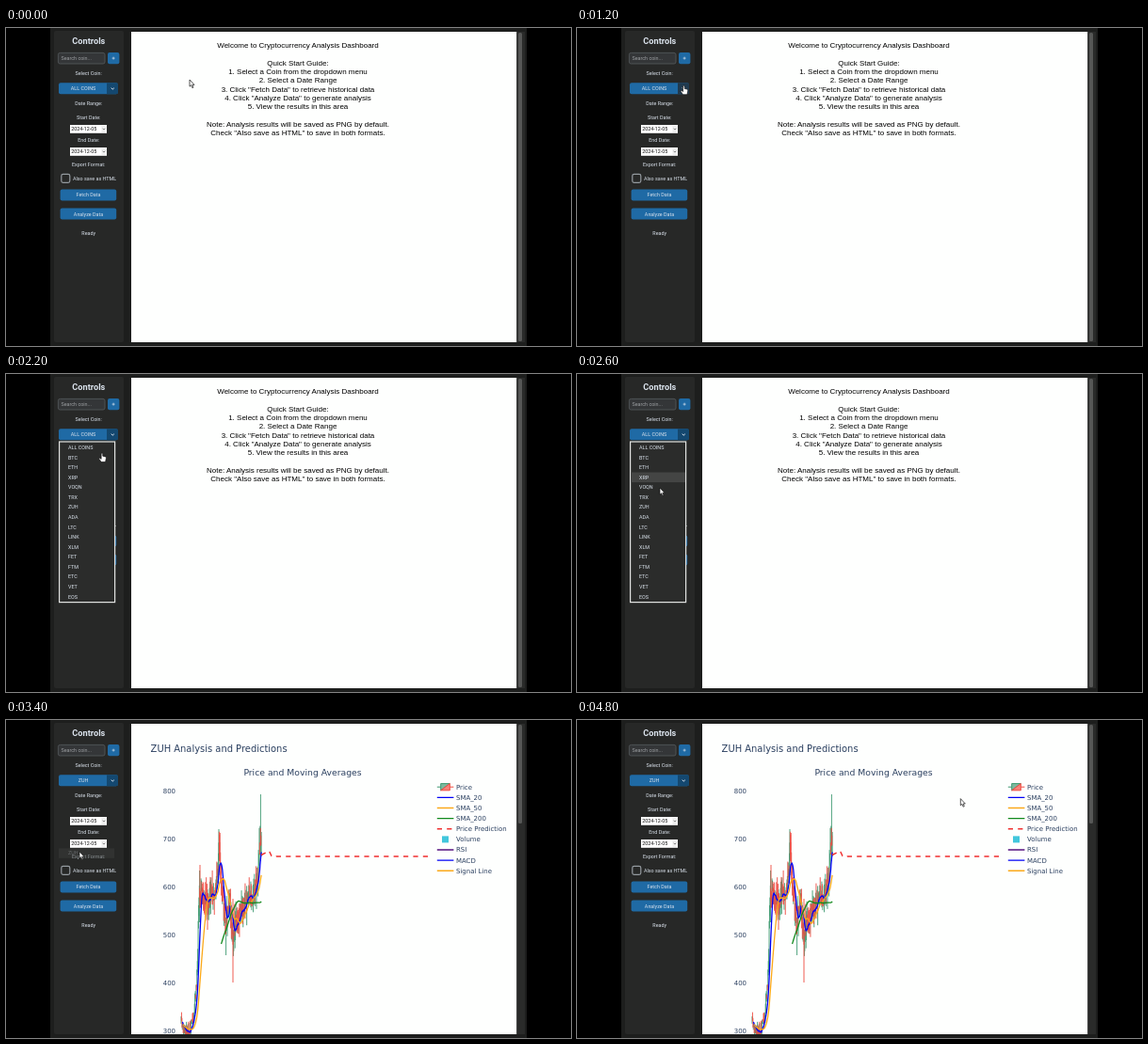
Recreate the animation shown at these times as an HTML page. Size 600 by 338 pixels, loop 5 s.

```html
<!DOCTYPE html>
<html lang="en">
<head>
<meta charset="utf-8">
<title>Dashboard</title>
<style>
html, body { margin: 0; width: 100%; height: 100%; overflow: hidden; background: #000; }
svg { display: block; width: 600px; height: 338px; }
.ui { font: 5.4px Roboto, sans-serif; fill: #dce4ee; }
.guide { font: 8px "Liberation Sans", Arial, sans-serif; fill: #000; }
.plot { font: 6.95px "DejaVu Sans", Verdana, sans-serif; fill: #2a3f5f; }
</style>
</head>
<body>
<svg id="stage" viewBox="0 0 600 338"></svg>
<script>
const NS = "http://www.w3.org/2000/svg";
const LOOP = 5000, STEP = 200;
const COIN = "ZUH";
const stage = document.getElementById("stage");

function add(parent, tag, attrs = {}, text) {
  const el = document.createElementNS(NS, tag);
  for (const key in attrs) el.setAttribute(key, attrs[key]);
  if (text !== undefined) el.textContent = text;
  parent.appendChild(el);
  return el;
}
const group = cls => add(stage, "g", { class: cls });
const box = (parent, x, y, width, height, fill, more = {}) =>
  add(parent, "rect", { x, y, width, height, fill, ...more });
const label = (parent, text, x, y, more = {}) =>
  add(parent, "text", { x, y, "text-anchor": "middle", ...more }, text);
const line = (parent, d, stroke, width, more = {}) =>
  add(parent, "path", { d, stroke, fill: "none", "stroke-width": width, ...more });
const show = (el, on) => el.setAttribute("visibility", on ? "visible" : "hidden");
const LEFT = { "text-anchor": "start" };

// Value at x on straight runs between key points [x, ...values]
function between(keys, x) {
  const i = Math.max(1, keys.findIndex(k => k[0] >= x));
  const a = keys[i - 1], b = keys[i], f = (x - a[0]) / (b[0] - a[0]);
  return a.slice(1).map((v, j) => v + (b[j + 1] - v) * f);
}

// Window
box(stage, 47, 0, 506, 338, "#1d1e1d");
box(stage, 51, 3, 74, 331, "#272827", { rx: 2 });
box(stage, 133, 4, 409.4, 330, "#fefffe");
box(stage, 542.4, 4, 8.6, 330, "#2a2b2a");
const thumb = box(stage, 544, 5, 4, 0, "#565756", { rx: 1.5 });

// Sidebar
const BLUE_BTN = "#1f6aa5";
const ui = group("ui");
label(ui, "Controls", 87.8, 17.3, { style: "font-size:9.2px;font-weight:700" });
box(ui, 55.4, 26.4, 49.6, 11.6, "#343638", { rx: 2, stroke: "#565b5e", "stroke-width": .8 });
label(ui, "Search coin...", 58.5, 34, { ...LEFT, fill: "#9c9fa2" });
box(ui, 108, 26, 12.4, 12.2, BLUE_BTN, { rx: 2 });
line(ui, "M112.6 32.1h3M114.1 30.6v3", "#dce4ee", .7);

[["Select Coin:", 50], ["Date Range:", 82], ["Start Date:", 97],
 ["End Date:", 121], ["Export Format:", 146.6], ["Ready", 219.6]]
  .forEach(([text, y]) => label(ui, text, 87.7, y));

box(ui, 56, 58.2, 62.8, 12, BLUE_BTN, { rx: 2 });
const arrowBox = add(ui, "path", { d: "M107 58.2h10a2 2 0 0 1 2 2v8a2 2 0 0 1-2 2h-10z" });
line(ui, "M111.7 63.7l1.6 1.4 1.6-1.4", "#dce4ee", 1);
const choice = label(ui, "", 82, 66.3);

for (const y of [103, 127]) {
  box(ui, 68, y, 39, 8.8, "#fff");
  box(ui, 101.4, y + .8, 5, 7.2, "#f0f0f0");
  line(ui, `M102.6 ${y + 3.7}l1.3 1.4 1.3-1.4`, "#555", .7);
  label(ui, "2024-12-05", 69.2, y + 6.3, { ...LEFT, fill: "#111" });
}
box(ui, 58.8, 155.4, 9, 9, "none", { rx: 1.8, stroke: "#949a9f", "stroke-width": 1.2 });
label(ui, "Also save as HTML", 71, 161.9, LEFT);
[["Fetch Data", 171.4], ["Analyze Data", 191.6]].forEach(([text, y]) => {
  box(ui, 57.6, y, 59.6, 12, BLUE_BTN, { rx: 2 });
  label(ui, text, 87.5, y + 7.9);
});

// Welcome text
const guide = group("guide");
["Welcome to Cryptocurrency Analysis Dashboard", "", "Quick Start Guide:",
 "1. Select a Coin from the dropdown menu", "2. Select a Date Range",
 "3. Click \"Fetch Data\" to retrieve historical data",
 "4. Click \"Analyze Data\" to generate analysis", "5. View the results in this area", "",
 "Note: Analysis results will be saved as PNG by default.",
 "Check \"Also save as HTML\" to save in both formats."]
  .forEach((text, i) => label(guide, text, 310, 21 + i * 9.32));

// Chart
const clip = add(add(stage, "defs"), "clipPath", { id: "page" });
box(clip, 133, 4, 409.4, 330, "#000");
const chart = group("plot");
chart.setAttribute("clip-path", "url(#page)");
label(chart, COIN + " Analysis and Predictions", 153.6, 33.5, { ...LEFT, style: "font-size:9.93px" });
label(chart, "Price and Moving Averages", 315, 59.4, { style: "font-size:9.27px" });
for (let i = 0; i < 6; i++)
  label(chart, 800 - i * 100, 180, 78.2 + i * 51, { "text-anchor": "end" });

const RED = "#ef4a40", GREEN = "#3d9970", BLUE = "#0000f5", ORANGE = "#fba91a",
  DARK = "#118a1c", PURPLE = "#55107f", DASH = { "stroke-dasharray": "5.2 5.2" };

// Price: a rough trend with seeded noise
const trend = [
  [186, 322], [189, 332], [196, 327], [200, 310], [203, 270], [205, 186], [209, 186],
  [214, 194], [224, 174], [226, 140], [228, 158], [233, 220], [237, 188], [241, 226],
  [246, 216], [254, 194], [264, 182], [268, 162], [270.4, 112], [272, 150]
];
let seed = 11;
const rand = () => (seed = seed * 16807 % 2147483647) / 2147483647;
const DX = .43, closes = [], bars = { [GREEN]: "", [RED]: "" };
for (let x = 186; x < 271.2; x += DX) {
  const [mid] = between(trend, x);
  const swing = mid > 250 ? .45 : 1;
  const y = mid + (rand() - .5) * 24 * swing;
  const last = closes.length ? closes[closes.length - 1][1] : mid;
  const wick = () => rand() ** 2 * 18 * swing;
  const top = Math.min(last, y) - wick(), low = Math.max(last, y) + wick();
  bars[y < last ? GREEN : RED] += `M${x.toFixed(2)} ${top.toFixed(1)}V${low.toFixed(1)}`;
  closes.push([x, y]);
}
line(chart, bars[GREEN] + "M205.6 160V215M226 116V165M233.6 210V250M270.4 79V150", GREEN, .9);
line(chart, bars[RED] + "M206 154V200M214 185V223M226.6 122V150M241 190V279", RED, .9);

function average(span, first, color) {
  const pts = closes.map(([x], i) => {
    const part = closes.slice(Math.max(0, i - span + 1), i + 1);
    return `${x.toFixed(2)} ${(part.reduce((sum, p) => sum + p[1], 0) / part.length).toFixed(1)}`;
  });
  line(chart, "M" + pts.slice(first).join("L"), color, 1.3, { "stroke-linejoin": "round" });
}
average(10, 3, BLUE);
average(25, 5, ORANGE);
average(100, 99, DARK);
line(chart, "M271 143.5L276 141L278 139L280 140.5L282 144.5L284.5 146L287 145H448", "#f02f2f", 1.5, DASH);

[["Price"], ["SMA_20", BLUE], ["SMA_50", ORANGE], ["SMA_200", DARK], ["Price Prediction", "#f02f2f", DASH],
 ["Volume"], ["RSI", PURPLE], ["MACD", BLUE], ["Signal Line", ORANGE]].forEach(([text, color, more], i) => {
  const y = 71.2 + i * 11.13;
  label(chart, text, 478, y + 2.5, LEFT);
  if (color) line(chart, `M457.8 ${y}h17.6`, color, 1.4, more);
});
box(chart, 463, 123.4, 7, 7, "#42c6dc");
add(chart, "path", { d: "M457.8 71.2h3.9M461.7 74.8v-7.2h9.6z", fill: "#7fb99f", stroke: GREEN, "stroke-width": 1 });
add(chart, "path", { d: "M475.4 71.2h-3.9M471.3 67.6v7.2h-9.6z", fill: "#f7837b", stroke: RED, "stroke-width": 1 });

// Dropdown menu
const ROW = 10.57;
const coins = ["ALL COINS", "BTC", "ETH", "XRP", "VOQN", "TRX", COIN, "ADA", "LTC", "LINK",
  "XLM", "FET", "FTM", "ETC", "VET", "EOS"];
const menu = group("ui");
box(menu, 56.6, 72, 59, 170.6, "#2b2c2b", { stroke: "#e2e3e2", "stroke-width": 1.2 });
const hover = box(menu, 57.3, 0, 57.7, ROW, "#444544");
coins.forEach((text, i) => label(menu, text, 66, 80 + i * ROW, LEFT));

// Last trace of the closing menu
const ghost = group("ui");
box(ghost, 56, 136.4, 59, 10.4, "#3a3b3a", { opacity: .55 });
label(ghost, COIN, 66, 143.4, { ...LEFT, opacity: .3 });

// Pointers, tip at the origin
const edge = { fill: "#fff", stroke: "#111", "stroke-width": .7, "stroke-linejoin": "round" };
const arrow = add(stage, "path", { d: "M0 0V7.2L1.6 5.8L2.8 8.6L4 8.1L2.8 5.4H5z", ...edge });
const hand = add(stage, "path", {
  d: "M-.9 .8Q0-.5 .8 .8V3.4L3.6 4.1Q4.6 4.5 4.4 5.8L3.6 9.8H-.9L-3.2 6.4Q-3.4 5.2-2.2 5.5L-.9 6.6z", ...edge
});

// Pointer route: step, x, y
const route = [
  [0, 195, 55], [1, 195, 55], [2, 154.4, 47.6], [3, 139.4, 43], [4, 107.8, 39], [5, 106, 40.6],
  [6, 113.4, 61], [9, 113.4, 63.4], [11, 102, 83.8], [13, 88, 121], [15, 78, 139.6],
  [18, 78, 140], [19, 102.5, 127], [21, 115, 60], [23, 115, 67.4], [24, 407.3, 83.6]
];
const within = (n, from, to) => n >= from && n <= to;

function draw(n) {
  const done = n >= 17;
  const [x, y] = between(route, n);
  const overArrow = within(n, 6, 9) || within(n, 21, 23);
  const useHand = overArrow || within(n, 10, 11);
  for (const el of [arrow, hand]) el.setAttribute("transform", `translate(${x} ${y})`);
  show(arrow, !useHand);
  show(hand, useHand);
  arrowBox.setAttribute("fill", overArrow ? "#203a4f" : "#144870");
  choice.textContent = done ? COIN : coins[0];
  show(guide, !done);
  show(chart, done);
  thumb.setAttribute("height", done ? 105 : 328);
  show(menu, within(n, 8, 16));
  menu.setAttribute("opacity", n === 8 ? .66 : 1);
  // The highlight trails one row behind the pointer
  const row = Math.floor((y - 72.8) / ROW) - 1;
  hover.setAttribute("y", 72.8 + row * ROW);
  hover.setAttribute("opacity", n < 12 ? 0 : 1);
  show(ghost, n === 17);
}

const start = performance.now();
function tick() {
  draw(Math.floor((performance.now() - start) % LOOP / STEP));
  requestAnimationFrame(tick);
}
tick();
</script>
</body>
</html>
```
